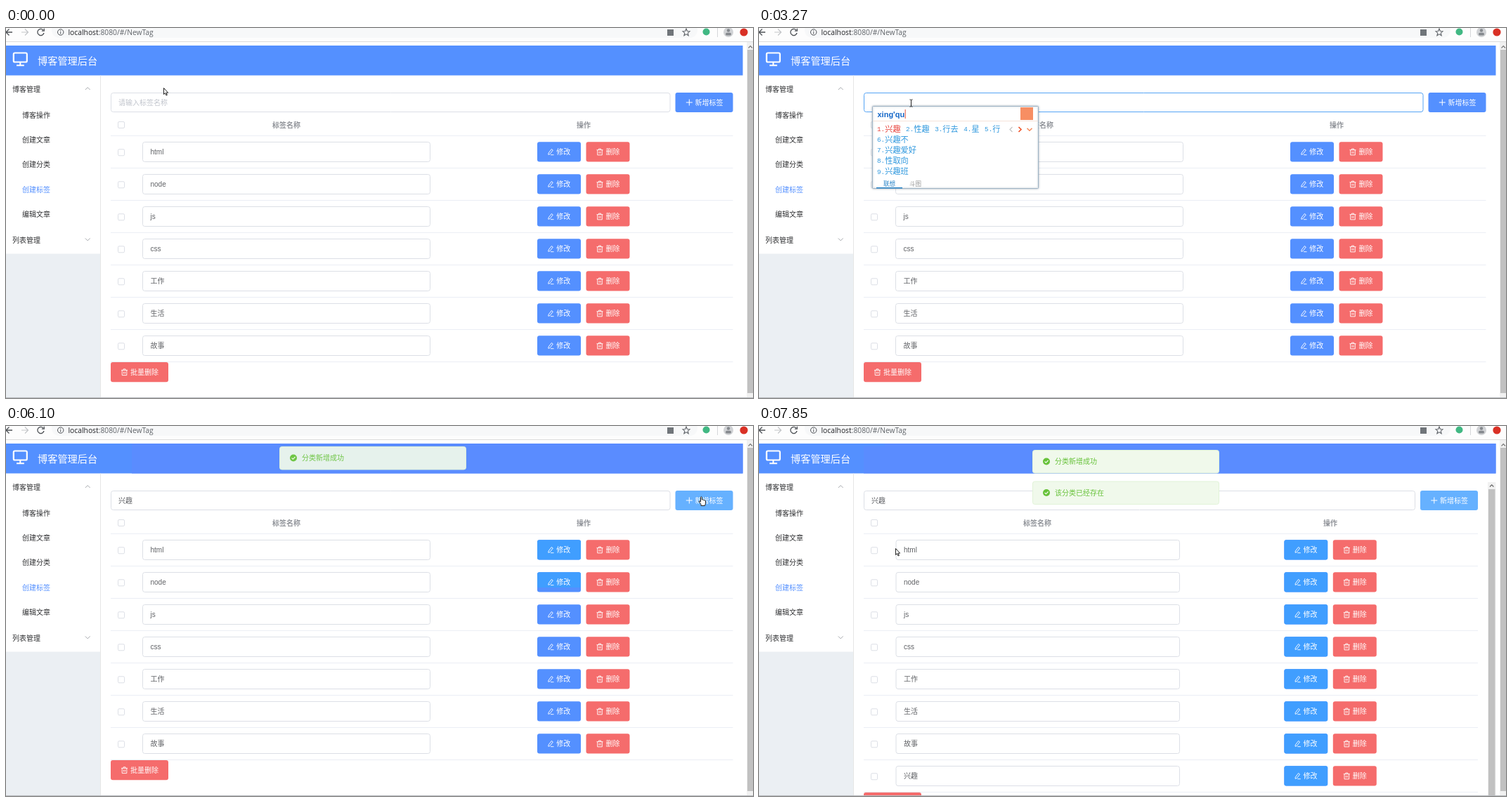
Recreate the animation shown at these times as an HTML page with a canvas. Size 1063 by 527 pixels, loop 8000 ms.

```html
<!DOCTYPE html>
<html lang="zh">
<head>
<meta charset="utf-8">
<style>
html, body { margin: 0; width: 100%; height: 100%; overflow: hidden; background: #fff; }
canvas { display: block; width: 1063px; height: 527px; }
</style>
</head>
<body>
<canvas id="stage" width="1063" height="527"></canvas>
<script>
const ctx = document.getElementById('stage').getContext('2d');
const LOOP = 8000;
const SANS = '"Liberation Sans", "Noto Sans CJK SC", "Noto Sans CJK", sans-serif';
const BLUE = '#5490ff', BRIGHT = '#409eff', HOVER = '#66b1ff', RED = '#f56c6c', GREEN = '#67c23a';
const TAGS = ['html', 'node', 'js', 'css', '工作', '生活', '故事', '兴趣'];
const ADDED = 6250;

// [time, shape, x, y]
const CURSOR = [
  [0, 'arrow', 224, 85], [120, 'beam', 221, 102], [270, 'beam', 216.5, 107],
  [4500, 'none', 0, 0], [4650, 'arrow', 1045, 0], [4770, 'arrow', 1048, 0],
  [4920, 'hand', 971, 117], [5200, 'hand', 979, 109], [5320, 'hand', 988, 100],
  [5860, 'hand', 985.5, 100], [6500, 'hand', 984, 100], [6620, 'hand', 982, 100],
  [6740, 'hand', 981, 101], [6860, 'hand', 980, 101], [7010, 'hand', 978, 105],
  [7160, 'hand', 976, 109], [7430, 'arrow', 84, 200], [7550, 'arrow', 153, 291],
  [7700, 'arrow', 26, 229], [7850, 'arrow', 194, 174]
];
const SHAPES = {
  arrow: new Path2D('M.5 .5V9.5L2.6 7.6L4 11L5.4 10.4L4 7.2H6.6Z'),
  hand: new Path2D('M3.5 13.5V11.5L.8 8Q.3 6.8 1.5 6.6L3 8V1.3Q3.8 0 4.8 1.3V5Q6 4.4 6.6 5.4Q8 4.9 8.4 6Q9.8 5.6 10 7V10L9 13.5Z'),
  beam: new Path2D('M-2-5H-.6L0-4.5L.6-5H2M0-4.5V4.5M-2 5H-.6L0 4.5L.6 5H2')
};

// [time, pinyin, window right edge, candidates]
const IME = [
  [2590, 'xi', 365, ['系', '西', '洗', '喜', '吸', '细', '希', '戏', '席']],
  [2740, 'xing', 365, ['行', '性', '星', '型', '形', '姓', '醒', '幸', '兴']],
  [2990, "xing'q", 421, ['兴趣', '性情', '星球', '星期', '行情', '兴起', '兴趣爱好', '性取向', '星期一']],
  [3270, "xing'qu", 398, ['兴趣', '性趣', '行去', '星', '行', '兴趣不', '兴趣爱好', '性取向', '兴趣班']],
  [3540, '']
];
// [time, top, opacity]
const TOAST_1 = [[5860, 20, .3], [5980, 25, .65], [6100, 29, .94], [6250, 34, 1]];
const TOAST_2 = [[7160, 67, .65], [7280, 77, .92], [7430, 78.5, 1]];
// [time, border colour of the main input]
const BORDER = [[0, '#dcdfe6'], [270, '#c0c4cc'], [390, '#75b5f3'], [510, '#55a4f5'], [5470, '#a9cdf2'], [5590, '#dcdfe6']];

const at = (keys, t) => keys.filter(k => k[0] <= t).pop();
const between = (t, a, b) => t >= a && t < b;

function rect(x, y, w, h, fill) {
  ctx.fillStyle = fill;
  ctx.fillRect(x, y, w, h);
}
function box(x, y, w, h, r, fill, stroke) {
  ctx.beginPath();
  ctx.roundRect(x, y, w, h, r);
  if (fill) { ctx.fillStyle = fill; ctx.fill(); }
  if (stroke) { ctx.strokeStyle = stroke; ctx.lineWidth = 1; ctx.stroke(); }
}
function disc(x, y, r, fill) {
  ctx.beginPath();
  ctx.arc(x, y, r, 0, 7);
  ctx.fillStyle = fill;
  ctx.fill();
}
function line(d, color, width = 1, x = 0, y = 0) {
  ctx.save();
  ctx.translate(x, y);
  ctx.strokeStyle = color;
  ctx.lineWidth = width;
  ctx.stroke(new Path2D(d));
  ctx.restore();
}
function text(s, x, midY, color, size = 10, { weight = '', align = 'left', family = SANS } = {}) {
  ctx.font = `${weight} ${size}px ${family}`;
  ctx.textAlign = align;
  ctx.fillStyle = color;
  ctx.fillText(s, x, midY + size * .37);
  return ctx.measureText(s).width;
}

function browserBar() {
  rect(0, 0, 1063, 19, '#fdfdfd');
  box(65, -8, 919, 22, 11, '#f7f8f9');
  rect(0, 19, 1063, 1, '#dcdcdc');
  line('M9 6H0M4.5 1.5L0 6L4.5 10.5', '#4d5156', 1.3);
  line('M22 6H31.5M27 1.5L31.5 6L27 10.5', '#c3c5c8', 1.2);
  line('M53 3A4.6 4.6 0 1 0 54 7M54.3 .8V4.2H50.8', '#4d5156', 1.3);
  line('M73.5 6a4.2 4.2 0 1 0 8.4 0a4.2 4.2 0 1 0-8.4 0M77.7 5.4V8.5M77.7 3.4V4.5', '#4d5156');
  const family = '"Open Sans", "Noto Sans", sans-serif';
  const w = text('localhost', 88.5, 6, '#202124', 10.3, { family });
  text(':8080/#/NewTag', 88.5 + w, 6, '#5f6368', 10.3, { family });
  rect(941, 2, 9, 9, '#70757a');
  line('M968 1L969.4 4.5L973 4.8L970.2 7.2L971.1 10.8L968 8.8L964.9 10.8L965.8 7.2L963 4.8L966.6 4.5Z', '#5f6368', 1.1);
  disc(996.5, 5.5, 5, '#41b883');
  rect(1012, 0, 1, 13, '#d5d7da');
  disc(1028, 6, 7, '#d0d2d5');
  disc(1028, 3.5, 2.2, '#85898e');
  box(1024, 6.8, 8, 3.7, 2, '#85898e');
  disc(1050, 6, 5.6, '#d93025');
}

function pageFrame(t) {
  rect(0, 25, 1048.5, 42.5, BLUE);
  if (t >= 4920) rect(179, 25, 869.5, 42.5, '#5a8cff');
  if (t >= ADDED) rect(149, 29, 30, 38.5, '#5a8cff');
  box(10.8, 35.5, 19, 13, 1.8);
  ctx.strokeStyle = '#fff';
  ctx.lineWidth = 2.2;
  ctx.stroke();
  line('M20.3 49V53M15 53.3H25.8', '#fff', 2);
  text('博客管理后台', 45, 47, '#fff', 14.2);

  rect(1054, 20, 9, 507, '#f1f1f1');
  rect(1055, 31, 8, 489, '#c1c1c1');
  line('M1056.5 28.5L1059.3 25.7L1062 28.5', '#777', 1.2);

  rect(0, 321.5, 134, 206, '#ebeff3');
  rect(134, 67.5, 1, 460, '#e6e6e6');
  text('博客管理', 9, 87, '#303133');
  ['博客操作', '创建文章', '创建分类', '创建标签', '编辑文章'].forEach((s, i) =>
    text(s, 23, 124.5 + i * 35.1, i === 3 ? BLUE : '#303133'));
  text('列表管理', 9, 302, '#303133');
  line('M112.8 88L116.2 84.6L119.6 88', '#a6a9ae');
  line('M112.8 299.5L116.2 302.9L119.6 299.5', '#a6a9ae');
}

function trash(x, y) {
  line('M0 2H9M3 2V.4H6V2M1.2 2V9.2H7.8V2M3.5 4.2V7M5.5 4.2V7', '#fff', .9, x, y - 4.8);
}
function deleteButton(x, y, w, label) {
  box(x, y, w, 28.3, 3, RED);
  trash(x + 15, y + 14.2);
  text(label, x + 28, y + 14.2, '#fff');
}
function editButton(x, y, split) {
  box(x, y, 62, 28.3, 3, BLUE);
  ctx.save();
  ctx.beginPath();
  ctx.rect(x, 0, 62, split);
  ctx.clip();
  box(x, y, 62, 28.3, 3, BRIGHT);
  ctx.restore();
  line('M1.5 6.5L5.8 .8L7.8 2.3L3.5 8L1.3 8.6ZM4.5 9H9', '#fff', .9, x + 14.5, y + 9.4);
  text('修改', x + 27.3, y + 14.2, '#fff');
}
function checkbox(y) {
  box(159.5, y - 4.5, 9, 9, 1.5, '#fff', '#dcdfe6');
}

function newTagBar(t, right) {
  const inputRight = right - 89;
  box(149.5, 92.5, inputRight - 150, 27, 3, '#fff', at(BORDER, t)[1]);
  const empty = t < 2590;
  if (empty) text('请输入标签名称', 160, 106, '#c0c4cc');
  if (t >= 3540) text('兴趣', 160, 106, '#606266');
  if (between(t, 390, 820) || between(t, 1350, 1910) || between(t, 2470, 2590)) rect(160, 100, 1, 12, '#333');
  if (between(t, 3540, 3970) || between(t, 4500, 5050)) rect(179.5, 100, 1, 12, '#333');
  if (between(t, 3540, 5470)) line('M929.3 106a4.2 4.2 0 1 0 8.4 0a4.2 4.2 0 1 0-8.4 0M932 104.5L935 107.5M935 104.5L932 107.5', '#c0c4cc', .9);

  const pressed = between(t, 5470, 5590) || between(t, 7010, 7160);
  box(right - 82, 92, 82, 28, 3, pressed ? '#3a8ee6' : t >= 4920 ? HOVER : BLUE);
  line('M-4.5 0H4.5M0-4.5V4.5', '#fff', 1, right - 62.2, 106);
  text('新增标签', right - 54, 106, '#fff');
}

function table(t) {
  const added = t >= ADDED;
  const right = added ? 1023 : 1034.5;
  const editX = added ? 747.3 : 756;
  const inputX = added ? 195 : 194.5;
  const inputW = added ? 403.5 : 409;
  const count = added ? 8 : 7;
  const split = added ? 527 : t >= 3540 ? 230 : 0;

  newTagBar(t, right);
  const bold = { weight: 'bold', align: 'center' };
  checkbox(138);
  text('标签名称', added ? 396 : 399, 138, '#909399', 10, bold);
  text('操作', added ? 813 : 822, 138, '#909399', 10, bold);
  rect(149, 153, right - 149, 1, '#ebeef5');
  for (let i = 0; i < count; i++) {
    const y = 162.3 + i * 46;
    checkbox(y + 15);
    box(inputX, Math.floor(y) + .5, inputW, 28, 3, '#fff', '#dcdfe6');
    text(TAGS[i], inputX + 11, y + 14, '#606266');
    editButton(editX, y, split);
    deleteButton(editX + 69.5, y, 62, '删除');
    rect(149, 199 + i * 46, right - 149, 1, '#ebeef5');
  }
  deleteButton(149, 154 + count * 46, 82, '批量删除');
  if (added) {
    rect(1037, 80, 11.5, 447, '#f1f1f1');
    rect(1038, 90, 9.5, 437, '#c1c1c1');
    line('M1040 86.5L1042.7 83.8L1045.4 86.5', '#666', 1.2);
  }
}

function candidate(n, word, x, y) {
  const color = n === 1 ? '#e8433c' : '#2f98de';
  text(n + '.', x, y, color, 9.3, { family: '"Liberation Mono", monospace' });
  return 11.2 + text(word, x + 11.2, y, color, 11.2, { weight: 300 });
}
function imeWindow(t) {
  const state = at(IME, t);
  if (!state || !state[1]) return;
  const [, pinyin, right, words] = state;
  ctx.save();
  ctx.shadowColor = 'rgba(60,80,100,.4)';
  ctx.shadowBlur = 3;
  box(161.5, 111.5, right - 162, 117, 1, '#fff', '#9fb4c6');
  ctx.restore();
  const w = text(pinyin, 168.5, 122.5, '#1467c8', 11, { weight: 'bold' });
  rect(169 + w, 116, 1, 13, '#e05540');
  rect(162, 132, right - 163, 1, '#f6e3da');
  rect(right - 26, 113, 18, 18, '#f78e63');
  let x = 168;
  words.forEach((word, i) => {
    if (i < 5) x += candidate(i + 1, word, x, 143.5) + 7.5;
    else candidate(i + 1, word, 168, 158.5 + (i - 5) * 15.2);
  });
  line('M-37.5-3.5L-41 0L-37.5 3.5', '#c5c5c5', 1.2, right, 144.5);
  line('M-28.5-3.5L-25 0L-28.5 3.5', '#f0562c', 1.7, right, 144.5);
  line('M-16.5-1.7L-13 1.8L-9.5-1.7', '#f58a5c', 1.5, right, 144.5);
  text('联想', 177, 221.5, '#2a85c8', 8.6);
  text('斗图', 214, 221.5, '#999', 8.6);
  rect(167, 227, 37, 1.5, '#2a85c8');
}

function toast(keys, label, t) {
  const state = at(keys, t);
  if (!state) return;
  const [, y, alpha] = state;
  ctx.save();
  ctx.globalAlpha = alpha;
  box(389.5, y + .5, 265, 32.5, 3, '#f0f9eb', '#e1f3d8');
  disc(409, y + 16.5, 5, GREEN);
  line('M-2.4 0L-.6 1.8L2.5-1.5', '#fff', 1.1, 409, y + 16.5);
  text(label, 421, y + 16.5, GREEN);
  ctx.restore();
}

function cursor(t) {
  const [, shape, x, y] = at(CURSOR, t);
  if (shape === 'none') return;
  ctx.save();
  ctx.translate(x, y);
  ctx.strokeStyle = '#222';
  ctx.lineWidth = 1;
  if (shape !== 'beam') {
    ctx.fillStyle = '#fff';
    ctx.fill(SHAPES[shape]);
  }
  ctx.stroke(SHAPES[shape]);
  ctx.restore();
}

function draw(t) {
  rect(0, 0, 1063, 527, '#fff');
  browserBar();
  pageFrame(t);
  table(t);
  imeWindow(t);
  toast(TOAST_1, '分类新增成功', t);
  toast(TOAST_2, '该分类已经存在', t);
  rect(0, 526, 1063, 1, '#b9bcc0');
  cursor(t);
}

const start = performance.now();
function tick() {
  draw((performance.now() - start) % LOOP);
  requestAnimationFrame(tick);
}
tick();
</script>
</body>
</html>
```
